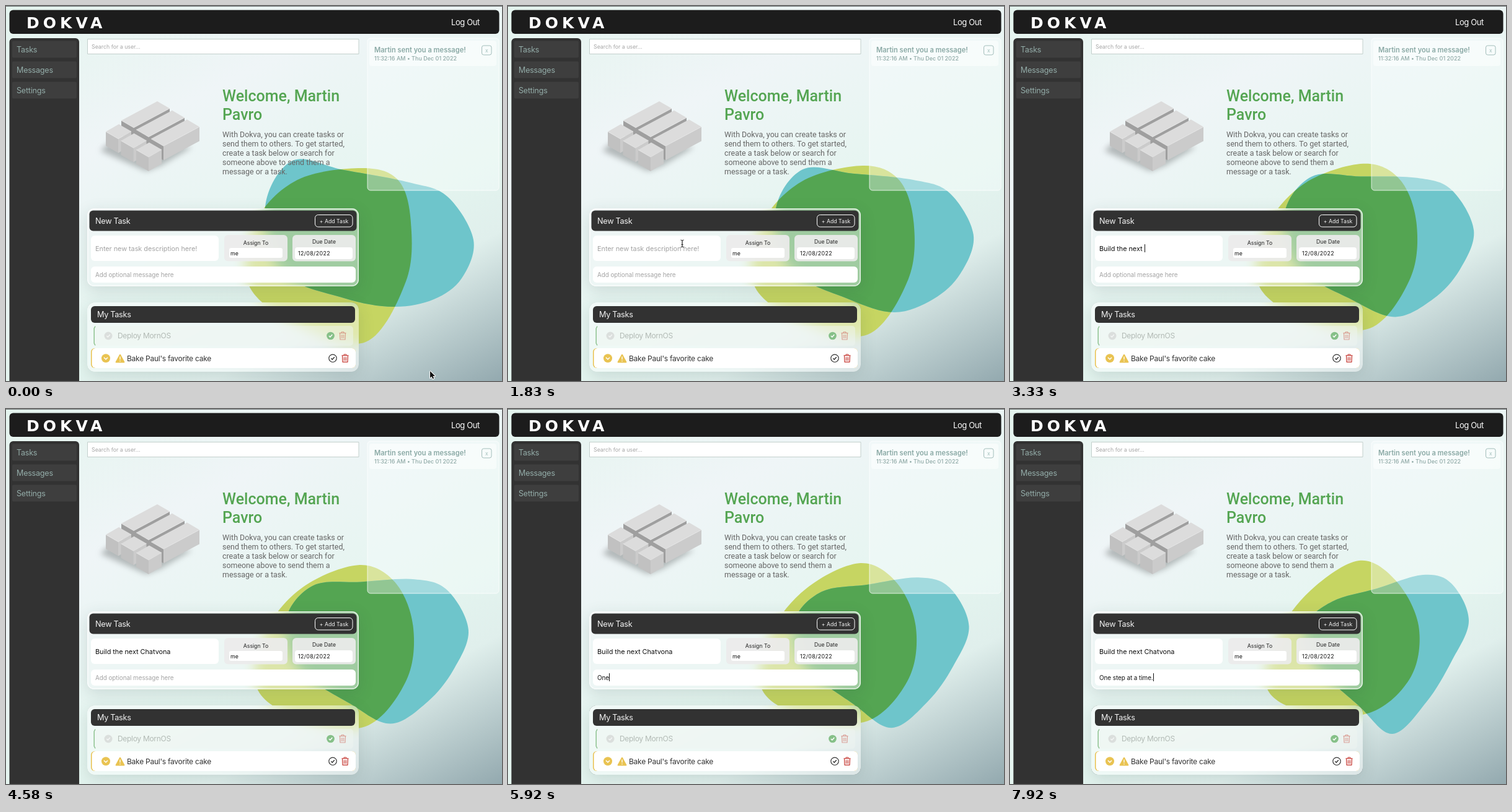
An HTML page with a canvas for the animation above (8000 ms loop, 800 px wide and 606 px high).

```html
<!DOCTYPE html>
<html lang="en">
<head>
<meta charset="utf-8">
<title>Task board</title>
<style>
html, body { margin: 0; width: 100%; height: 100%; overflow: hidden; background: #e6f4ef; }
canvas { display: block; width: 800px; height: 606px; }
</style>
</head>
<body>
<canvas id="stage" width="800" height="606"></canvas>
<script>
const W = 800, H = 606, LOOP = 8000, STEP = LOOP / 96;
const SANS = 'Inter, "Noto Sans", sans-serif';
const ROBOTO = 'Roboto, sans-serif';
const DARK = '#323232', INK = '#111', HINT = '#a3a3a3';
const ctx = document.getElementById('stage').getContext('2d');
const scene = document.createElement('canvas');
scene.width = W;
scene.height = H;
const back = scene.getContext('2d');

// Key points of each blob: start x, start y, end x, end y
const TEAL = [
  [418, 325, 477, 350], [462, 250, 520, 311], [545, 265, 592, 290], [650, 285, 666, 268],
  [712, 308, 712, 282], [754, 378, 740, 342], [735, 440, 712, 408], [690, 474, 672, 473],
  [625, 486, 617, 525], [545, 472, 562, 479], [445, 430, 490, 410]
];
const YELLOW = [
  [575, 262, 563, 245], [633, 282, 622, 277], [653, 350, 659, 350], [645, 445, 647, 432],
  [580, 543, 580, 491], [470, 515, 475, 489], [391, 450, 414, 450], [402, 350, 432, 365],
  [470, 281, 485, 293]
];

// Typed fields: start in ms and characters per ms
const DESC = { value: 'Build the next Chatvona', start: 1950, rate: 0.011 };
const NOTE = { value: 'One step at a time.', start: 5515, rate: 0.0086 };

const mix = (a, b, k) => a + (b - a) * k;
const clamp = v => Math.max(0, Math.min(1, v));
const typed = ({ value, start, rate }, t) => value.slice(0, Math.max(0, Math.floor((t - start) * rate)));

// Closed smooth curve through the blended points
function blobPath(shape, k) {
  const pts = shape.map(([a, b, c, d]) => [mix(a, c, k), mix(b, d, k)]);
  const n = pts.length, path = new Path2D();
  path.moveTo(...pts[0]);
  for (let i = 0; i < n; i++) {
    const p = pts[(i + n - 1) % n], a = pts[i], b = pts[(i + 1) % n], q = pts[(i + 2) % n];
    path.bezierCurveTo(
      a[0] + (b[0] - p[0]) / 6, a[1] + (b[1] - p[1]) / 6,
      b[0] - (q[0] - a[0]) / 6, b[1] - (q[1] - a[1]) / 6, b[0], b[1]);
  }
  path.closePath();
  return path;
}

function box(x, y, x2, y2, r, fill, stroke, lw = 1) {
  ctx.beginPath();
  ctx.roundRect(x, y, x2 - x, y2 - y, r);
  if (fill) { ctx.fillStyle = fill; ctx.fill(); }
  if (stroke) { ctx.strokeStyle = stroke; ctx.lineWidth = lw; ctx.stroke(); }
}

function text(str, x, y, size, color, { weight = 400, font = SANS, gap = 0, align = 'left' } = {}) {
  ctx.font = `${weight} ${size}px ${font}`;
  ctx.letterSpacing = gap + 'px';
  ctx.textAlign = align;
  ctx.fillStyle = color;
  ctx.fillText(str, x, y);
  return x + ctx.measureText(str).width;
}

function poly(pts, fill) {
  ctx.beginPath();
  pts.forEach(p => ctx.lineTo(...p));
  ctx.closePath();
  ctx.fillStyle = fill;
  ctx.fill();
}

function line(pts, color, lw) {
  ctx.beginPath();
  pts.forEach(p => ctx.lineTo(...p));
  ctx.strokeStyle = color;
  ctx.lineWidth = lw;
  ctx.stroke();
}

function disc(x, y, r, fill, stroke) {
  ctx.beginPath();
  ctx.arc(x, y, r, 0, Math.PI * 2);
  if (fill) { ctx.fillStyle = fill; ctx.fill(); }
  if (stroke) { ctx.strokeStyle = stroke; ctx.lineWidth = 1.2; ctx.stroke(); }
}

function drawBackdrop(k) {
  const g = back.createLinearGradient(0, 0, 417, 807);
  g.addColorStop(0, '#e4f4ee');
  g.addColorStop(0.3, '#eff5f7');
  g.addColorStop(0.62, '#e4f5ef');
  g.addColorStop(0.76, '#e0efec');
  g.addColorStop(1, '#92a8ae');
  back.fillStyle = g;
  back.fillRect(0, 0, W, H);
  const teal = blobPath(TEAL, k), yellow = blobPath(YELLOW, k);
  back.fillStyle = '#c6d562';
  back.fill(yellow);
  back.fillStyle = '#6ec5cb';
  back.fill(teal);
  back.save();
  back.clip(yellow);
  back.fillStyle = '#54a552';
  back.fill(teal);
  back.restore();
}

// Frosted card with a soft outer shadow
function glass(x, y, x2, y2, r, tint) {
  const area = new Path2D();
  area.roundRect(x, y, x2 - x, y2 - y, r);
  const outside = new Path2D();
  outside.rect(0, 0, W, H);
  outside.addPath(area);
  ctx.save();
  ctx.clip(outside, 'evenodd');
  ctx.shadowColor = 'rgba(40,70,70,.15)';
  ctx.shadowBlur = 26;
  ctx.shadowOffsetY = 7;
  ctx.fill(area);
  ctx.restore();
  ctx.save();
  ctx.clip(area);
  ctx.filter = 'blur(10px)';
  ctx.drawImage(scene, 0, 0);
  ctx.filter = 'none';
  ctx.fillStyle = tint;
  ctx.fill(area);
  ctx.restore();
}

// Slanted block with a top, a front and a side face
function prism(x, y, u, v, h, front, side) {
  const a = [x, y], b = [x + u[0], y + u[1]];
  const c = [b[0] + v[0], b[1] + v[1]], d = [x + v[0], y + v[1]];
  const low = p => [p[0], p[1] + h];
  poly([a, d, low(d), low(a)], front);
  poly([d, c, low(c), low(d)], side);
  poly([a, b, c, d], '#dcdcdc');
  line([a, d, c], '#e8e8e8', 0.8);
}

function drawBlocks() {
  const lit = '#cbcbcb', front = '#c1c1c1', gap = '#9f9f9f', v = [20, 11.6];
  ctx.save();
  ctx.filter = 'blur(5px)';
  poly([[152, 234], [172, 216], [300, 228], [250, 258], [226, 267]], 'rgba(90,95,95,.4)');
  ctx.restore();
  for (let i = 0; i < 3; i++) {
    prism(186 + i * 24, 185 + i * 14.8, [58, -31], v, 23, gap, i < 2 ? gap : lit);
  }
  for (let i = 0; i < 3; i++) {
    prism(161 + i * 24.5, 203 + i * 14.7, [21, -12], v, 23, front, lit);
  }
}

function drawHeader() {
  ctx.fillStyle = '#6d7273';
  ctx.fillRect(0, 0, W, 1);
  box(5.5, 6.5, 795.5, 45, 6, '#1c1c1c');
  text('DOKVA', 33, 36, 25, '#fff', { weight: 700, font: '"DejaVu Sans", sans-serif', gap: 6 });
  text('Log Out', 718, 30.5, 13, '#fff', { gap: -0.4 });
}

function drawSidebar() {
  box(5.5, 52, 118, 620, 6, DARK);
  ['Tasks', 'Messages', 'Settings'].forEach((label, i) => {
    const y = 56.5 + i * 33;
    box(10, y, 114, y + 27, 2, '#3e3e3e');
    text(label, 17, y + 18.3, 12.6, '#93aca8', { gap: -0.25 });
  });
}

function drawWelcome() {
  box(131.5, 53.5, 569, 77.5, 0, '#fff', '#c3d0cc');
  text('Search for a user...', 138, 69, 8.8, '#a6a6a6');
  drawBlocks();
  const big = { weight: 500, font: ROBOTO };
  text('Welcome, Martin', 349, 154, 25, '#54a552', big);
  text('Pavro', 349, 184, 25, '#54a552', big);
  ['With Dokva, you can create tasks or', 'send them to others. To get started,',
   'create a task below or search for', 'someone above to send them a', 'message or a task.'
  ].forEach((s, i) => text(s, 349, 212 + i * 15, 12.45, '#666', { font: ROBOTO }));
}

function drawNotice() {
  box(583, 52, 795, 298, 5, 'rgba(246,252,251,.38)', 'rgba(255,255,255,.75)');
  box(586, 56, 791, 97, 4, 'rgba(255,255,255,.45)');
  text('Martin sent you a message!', 594, 74.5, 11.1, '#8aa9a5', { weight: 600 });
  text('11:32:16 AM • Thu Dec 01 2022', 594, 88, 9, '#8fa9a6', { weight: 500 });
  box(767.5, 64, 783, 79, 3, null, '#a3bebb');
  text('x', 775.3, 74.5, 8.5, '#a3bebb', { align: 'center' });
}

function field(value, hint, x, y, size, caret) {
  const width = text(value || hint, x, y, size, value ? INK : HINT, { gap: -0.05 });
  if (caret) {
    ctx.fillStyle = INK;
    ctx.fillRect(Math.round(value ? width : x), y - 11, 1, 13);
  }
}

function labelled(label, x, x2, y) {
  box(x, 370, x2, 412.5, 6, 'rgba(236,236,236,.93)');
  text(label, (x + x2) / 2, y, 8.7, '#222', { align: 'center' });
}

function drawForm(t) {
  glass(131, 327, 569, 453, 11, 'rgba(242,247,246,.48)');
  box(131.8, 327.8, 568.2, 452.2, 10, null, 'rgba(255,255,255,.7)', 1.6);
  box(134.5, 330.5, 565.5, 363.5, 6, DARK);
  text('New Task', 144, 352, 12.7, '#f2f2f2', { gap: -0.3 });
  box(498.5, 337.5, 559, 357, 5, null, '#fff');
  text('+ Add Task', 529, 351, 8.7, '#f2f2f2', { align: 'center' });

  box(137, 371, 343, 412, 6, '#fff');
  field(typed(DESC, t), 'Enter new task description here!', 144, 396, 10.9, t > DESC.start && t < 4400);

  labelled('Assign To', 352, 454, 385.5);
  box(360, 391, 446, 407, 3, '#fff');
  text('me', 362, 403, 8.8, INK);
  labelled('Due Date', 462, 564, 384);
  box(466, 390, 559, 409, 4, '#fff');
  text('12/08/2022', 471, 403, 8.8, INK, { gap: 0.4 });

  box(137, 421, 564, 447, 6, '#fff');
  field(typed(NOTE, t), 'Add optional message here', 144, 438, 9.9, t > 5080);
}

function tick(x, y, color) {
  line([[x - 2.6, y], [x - 0.7, y + 2], [x + 2.8, y - 2]], color, 1.4);
}

function trash(x, y, color) {
  line([[x - 5.5, y - 4.5], [x + 5.5, y - 4.5]], color, 1.2);
  line([[x - 2, y - 4.5], [x - 2, y - 6.3], [x + 2, y - 6.3], [x + 2, y - 4.5]], color, 1);
  line([[x - 4.5, y - 4], [x - 4, y + 6], [x + 4, y + 6], [x + 4.5, y - 4]], color, 1.2);
  for (const dx of [-1.9, 0, 1.9]) line([[x + dx, y - 2], [x + dx, y + 4]], color, 0.9);
}

function drawTasks() {
  glass(131, 479, 569, 591, 12, 'rgba(250,252,252,.48)');
  box(137, 485, 563, 512, 6, DARK);
  text('My Tasks', 147, 503, 12.7, '#f2f2f2', { gap: -0.3 });

  box(142, 517, 560, 549, 5, 'rgba(240,245,242,.5)');
  line([[144, 517.5], [142.2, 521], [142.2, 545], [144, 548.5]], '#93c596', 1.6);
  disc(165, 533, 6.5, '#dbdfdd');
  tick(165, 533, '#f4f6f5');
  text('Deploy MornOS', 180, 537.3, 12, '#b2bab5', { gap: -0.3 });
  disc(523.5, 533, 6.3, '#86c088');
  tick(523.5, 533, '#fff');
  trash(543, 533, 'rgba(205,95,80,.55)');

  box(137, 553, 564, 585, 6, '#e8c04c');
  box(138.5, 553, 564, 585, 6, '#fff');
  disc(161, 569.3, 7, '#e9c352');
  line([[158, 568], [161, 571], [164, 568]], '#fff', 1.5);
  const tri = [[184, 563.5], [190.5, 575.5], [177.5, 575.5], [184, 563.5]];
  ctx.lineJoin = 'round';
  poly(tri, '#e9c352');
  line(tri, '#e9c352', 1.8);
  line([[184, 566.5], [184, 571.5]], '#fff', 1.3);
  disc(184, 573.7, 0.8, '#fff');
  text("Bake Paul's favorite cake", 195, 573.7, 12, '#333', { gap: -0.25 });
  disc(527, 569.3, 6.2, null, '#333');
  tick(527, 569.3, '#333');
  trash(547, 569.3, '#c63a34');
}

// Pointer glides to the description field, where it becomes a text beam
function drawPointer(t) {
  if (t > DESC.start + 100) return;
  const s = clamp((t - 80) / 1670), k = s * s * (3 - 2 * s);
  const x = mix(684, 281, k), y = mix(590, 384, k);
  if (x < 343 && y < 412) {
    line([[x, y - 5], [x, y + 5]], '#222', 1.2);
    for (const d of [-1, 1]) line([[x - 2.5, y + 6 * d], [x, y + 5 * d], [x + 2.5, y + 6 * d]], '#222', 1);
    line([[x - 1.5, y + 1.5], [x + 1.5, y + 1.5]], '#222', 1);
    return;
  }
  const arrow = [[0, 0], [0, 11], [2.5, 8.7], [4.3, 12.6], [6.2, 11.8], [4.5, 8], [8, 8], [0, 0]]
    .map(([a, b]) => [x + a, y + b]);
  line(arrow, '#fff', 2);
  poly(arrow, INK);
}

function draw(t) {
  drawBackdrop(t / 7920);
  ctx.drawImage(scene, 0, 0);
  drawHeader();
  drawWelcome();
  drawNotice();
  drawForm(t);
  drawTasks();
  drawSidebar();
  drawPointer(t);
}

let shown = -1;
function update(now) {
  const i = Math.floor((now % LOOP) / STEP + 0.05);
  if (i !== shown) {
    shown = i;
    draw(i * STEP);
  }
  requestAnimationFrame(update);
}
requestAnimationFrame(update);
</script>
</body>
</html>
```
